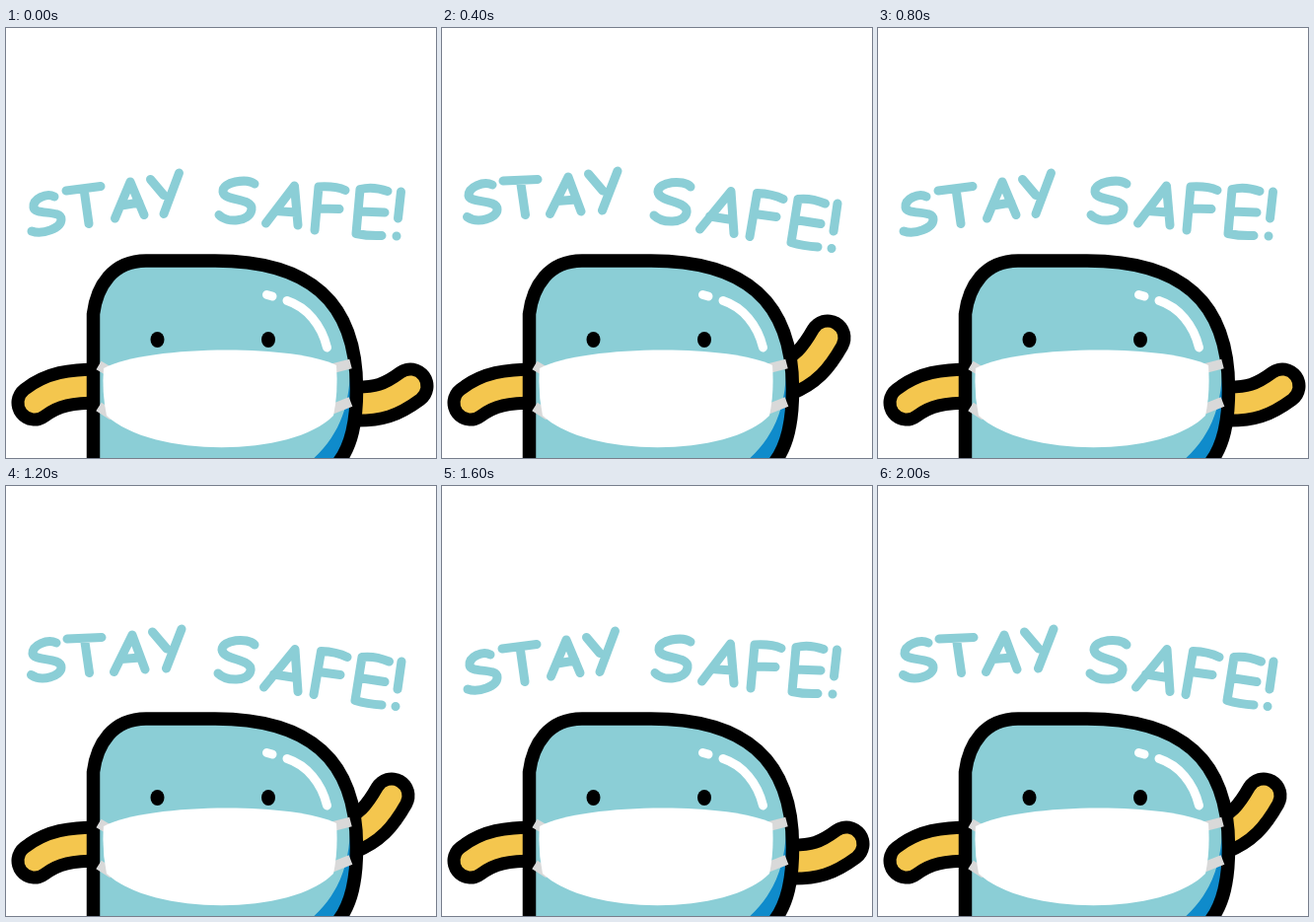
These frames come from a looping animation (436 by 436 pixels, 2400 ms). An HTML page:

```html
<!DOCTYPE html>
<html lang="en">
<head>
<meta charset="utf-8">
<title>Stay safe</title>
<style>
  html, body { margin: 0; width: 100%; height: 100%; overflow: hidden; background: #fff; }
  svg { display: block; width: 100%; height: 100%; }
  .line { fill: none; stroke-linecap: round; stroke-linejoin: round; }
  .lettering { stroke: #8bced6; stroke-width: 9; }
  .sleeve { stroke: #000; stroke-width: 47; }
  .arm { stroke: #f4c64e; stroke-width: 21; }
  .outline { stroke: #000; stroke-width: 13.5; }
  .strap { stroke: #d9d9d9; stroke-width: 10; stroke-linecap: butt; }
  .shine { stroke: #fff; stroke-width: 9; }
</style>
</head>
<body>
<svg viewBox="0 0 436 436" role="img" aria-label="STAY SAFE!">
  <defs>
    <path id="leftArm" d="M29 380C47 366 66 363 95 363"/>
    <path id="body" d="M88.500 450V290C92 262 108 236 142 236H212C304 236 355.500 274 355.500 366C355.500 398 351 424 336 442V450"/>
    <clipPath id="inside"><use href="#body"/></clipPath>
  </defs>

  <path id="lettering" class="line lettering"/>

  <use href="#leftArm" class="line sleeve"/>
  <use href="#leftArm" class="line arm"/>
  <path id="rightSleeve" class="line sleeve"/>
  <path id="rightArm" class="line arm"/>

  <use href="#body" fill="#8bced6"/>
  <path clip-path="url(#inside)" d="M349 335C350 380 340 412 308 440H360V335Z" fill="#0f8bcb"/>
  <use href="#body" class="line outline"/>

  <path class="line strap" d="M94 342L106 349M94 384L108 393M330 345.500L349.500 340.500M328 387.500L349.500 379"/>
  <path d="M99 345C142 322 290 320 335 342Q337 370 332 393C290 436 148 436 102 393Q97 369 99 345Z" fill="#fff"/>

  <ellipse cx="153.500" cy="316" rx="7" ry="8"/>
  <ellipse cx="266" cy="316" rx="7" ry="8"/>
  <path class="line shine" d="M264.500 270.500L270 272M285 276.500C305 283 320 301 325.500 324"/>
</svg>
<script>
  const POSE_MS = 400;

  // Hand-lettered strokes, one line per letter of STAY SAFE!
  const poses = [
    {
      arm: "M350 381C378 382 391 377 410 363",
      letters: [
        "M49 171C41 167 27 173 28 182C29 190 56 184 56 194C56 203 37 210 26 206",
        "M61 165L96 160.500M79 163L84 198.500",
        "M110.500 193L126 156L140 189.500M117 180L135 177",
        "M146.500 153.500L160 169.500M175.500 147L160 188.500",
        "M252 158C244 152 219 156 220 166C221 176 251 172 249 184C247 197 224 198 216 189.500",
        "M263.500 198L292.500 160L296 200M273 185.500L294 187",
        "M313 205L317 161Q334 160 344 164.500M316 183L338 183.500",
        "M387 165.500Q372 160 359 163.500L355 208.500Q367 211 381 210.500M358 186L384 187",
        "M400.500 166L397.500 193M396 211V211.100"
      ]
    },
    {
      arm: "M346 356C369 347 379 335 391 314",
      letters: [
        "M51 159C42 155 27 161 27 170C28 178 56 173 56 184C56 193 36 199 25.500 191.500",
        "M62 155L97 153.500M79.500 155L84.500 189.500",
        "M109.500 188.500L128 151L141 186M117 175.500L136 174",
        "M148.500 148L163 165M178 145L162.500 185",
        "M252 161C245 153 219 156 219 166C220 177 250 175 248 187C246 199 223 198 215 190",
        "M261.500 204L293 165.500L296 208.500M271.500 191L294 194.500",
        "M312 211.500L319.500 167.500Q335 168 346 173.500M317 188.500L339 191.500",
        "M388.500 178Q374 172 361 173.500L354 217.500Q366 221 381 222M358 194.500L384 198.500",
        "M401 178L397 206M395 223.500V223.600"
      ]
    }
  ];

  const setPath = (id, d) => document.getElementById(id).setAttribute("d", d);

  function draw(now) {
    const pose = poses[Math.floor(now / POSE_MS) % poses.length];
    setPath("lettering", pose.letters.join(""));
    setPath("rightSleeve", pose.arm);
    setPath("rightArm", pose.arm);
  }

  const start = performance.now();
  function tick() {
    draw(performance.now() - start);
    requestAnimationFrame(tick);
  }
  tick();
</script>
</body>
</html>
```
